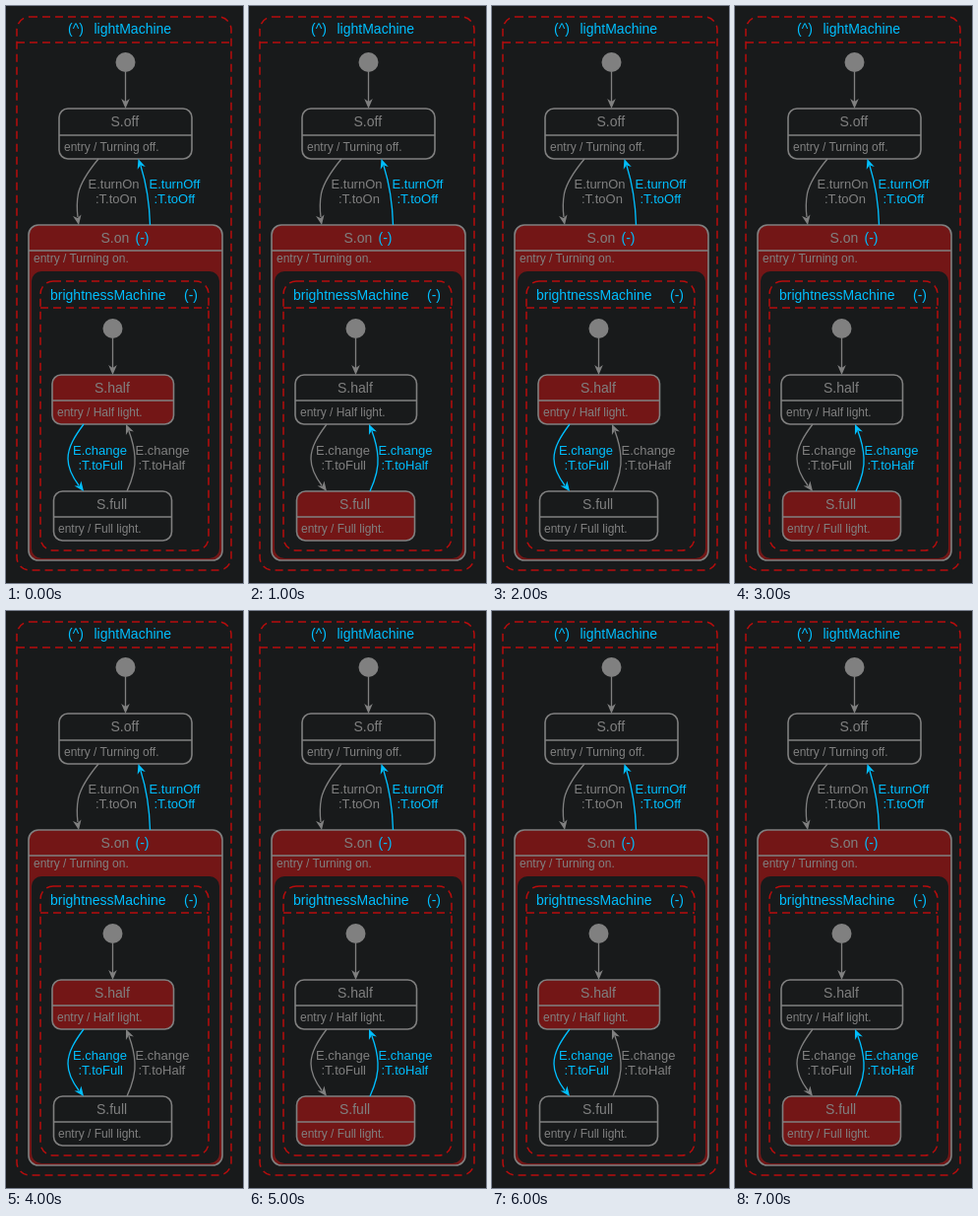
These frames come from a looping animation (241x585 px, 8000 ms). An HTML page:

```html
<!DOCTYPE html>
<html lang="en">
<head>
<meta charset="utf-8">
<title>Light machine</title>
<style>
  html, body { margin: 0; width: 100%; height: 100%; overflow: hidden; background: #181a1b; }
  svg { display: block; color: #808080; font: 14px "Liberation Sans", Arial, sans-serif; }
  text { fill: currentColor; white-space: pre; }
  .entry { font-size: 12px; }
  .label { font-size: 13px; }
  .line { fill: none; stroke: currentColor; stroke-width: 1.33; }
  .region { fill: none; stroke: #b80c0c; stroke-width: 1.5; stroke-dasharray: 8 5; }
  .state { fill: #181a1b; stroke: currentColor; stroke-width: 1.6; }
  .on { fill: #731616; }
  .blue, .half .from-half, .full .from-full { color: #00bfff; }
  .half .is-half, .full .is-full { fill: #731616; }
</style>
</head>
<body>
<svg id="chart" class="half" width="241" height="585" viewBox="0 0 241 585">
  <defs>
    <path id="tip" d="M0 0L-10 -4.3L-7 0L-10 4.3Z" fill="currentColor"/>
  </defs>

  <rect class="region" x="11" y="11" width="218" height="561" rx="13"/>
  <path class="region" d="M11 37H229"/>
  <g class="blue">
    <text x="63" y="28">(^)</text>
    <text x="89.5" y="28">lightMachine</text>
  </g>

  <circle cx="121.5" cy="57" r="10" fill="currentColor"/>
  <path class="line" d="M121.5 67V97"/>
  <use href="#tip" transform="translate(121.5 104) rotate(90)"/>

  <rect class="state" x="54" y="104" width="135" height="51" rx="9"/>
  <path class="line" d="M54 131H189"/>
  <text x="106.5" y="122">S.off</text>
  <text class="entry" x="59" y="147">entry / Turning off.</text>

  <rect class="state on" x="23" y="222" width="197" height="340" rx="10"/>
  <rect x="26" y="269" width="191" height="291" rx="10" fill="#181a1b"/>
  <path class="line" d="M23 248H220"/>
  <text x="96.5" y="240">S.on</text>
  <text class="blue" x="131.5" y="240">(-)</text>
  <text class="entry" x="28" y="260">entry / Turning on.</text>

  <g>
    <path class="line" d="M94 155C84 167 76 179 73.5 190C72 198 72 206 73 214"/>
    <use href="#tip" transform="translate(74 222) rotate(80)"/>
    <text class="label" x="83.5" y="185">E.turnOn</text>
    <text class="label" x="91" y="200">:T.toOn</text>
  </g>
  <g class="blue">
    <path class="line" d="M146.500 222C146 204 143 181 137 162"/>
    <use href="#tip" transform="translate(134.500 155) rotate(-109)"/>
    <text class="label" x="145.500" y="185">E.turnOff</text>
    <text class="label" x="150.500" y="200">:T.toOff</text>
  </g>

  <rect class="region" x="35" y="279" width="171" height="273" rx="13"/>
  <path class="region" d="M35 306H206"/>
  <g class="blue">
    <text x="45" y="298">brightnessMachine</text>
    <text x="181" y="298">(-)</text>
  </g>

  <circle cx="108.500" cy="327" r="10" fill="currentColor"/>
  <path class="line" d="M108.500 337V367"/>
  <use href="#tip" transform="translate(108.500 374) rotate(90)"/>

  <rect class="state is-half" x="47" y="374" width="123.500" height="50" rx="9"/>
  <path class="line" d="M47 400H170.500"/>
  <text x="90" y="392">S.half</text>
  <text class="entry" x="52" y="416">entry / Half light.</text>

  <rect class="state is-full" x="48.500" y="492" width="120" height="50" rx="9"/>
  <path class="line" d="M48.500 518H168.500"/>
  <text x="92" y="510">S.full</text>
  <text class="entry" x="53" y="534">entry / Full light.</text>

  <g class="from-half">
    <path class="line" d="M79 424C70 436 63 447 63 459C63 470 68 478 74 486"/>
    <use href="#tip" transform="translate(79 492) rotate(53)"/>
    <text class="label" x="68" y="455">E.change</text>
    <text class="label" x="73.500" y="470">:T.toFull</text>
  </g>
  <g class="from-full">
    <path class="line" d="M123 492C128 481 132 470 131 458C130.500 448 128 439 125 431"/>
    <use href="#tip" transform="translate(122 424) rotate(-113)"/>
    <text class="label" x="131.500" y="455">E.change</text>
    <text class="label" x="134.500" y="470">:T.toHalf</text>
  </g>
</svg>
<script>
  const chart = document.getElementById("chart");
  const states = ["half", "full"];
  const start = performance.now();

  function draw() {
    const second = Math.floor((performance.now() - start) / 1000);
    chart.setAttribute("class", states[second % 2]);
    requestAnimationFrame(draw);
  }
  draw();
</script>
</body>
</html>
```
